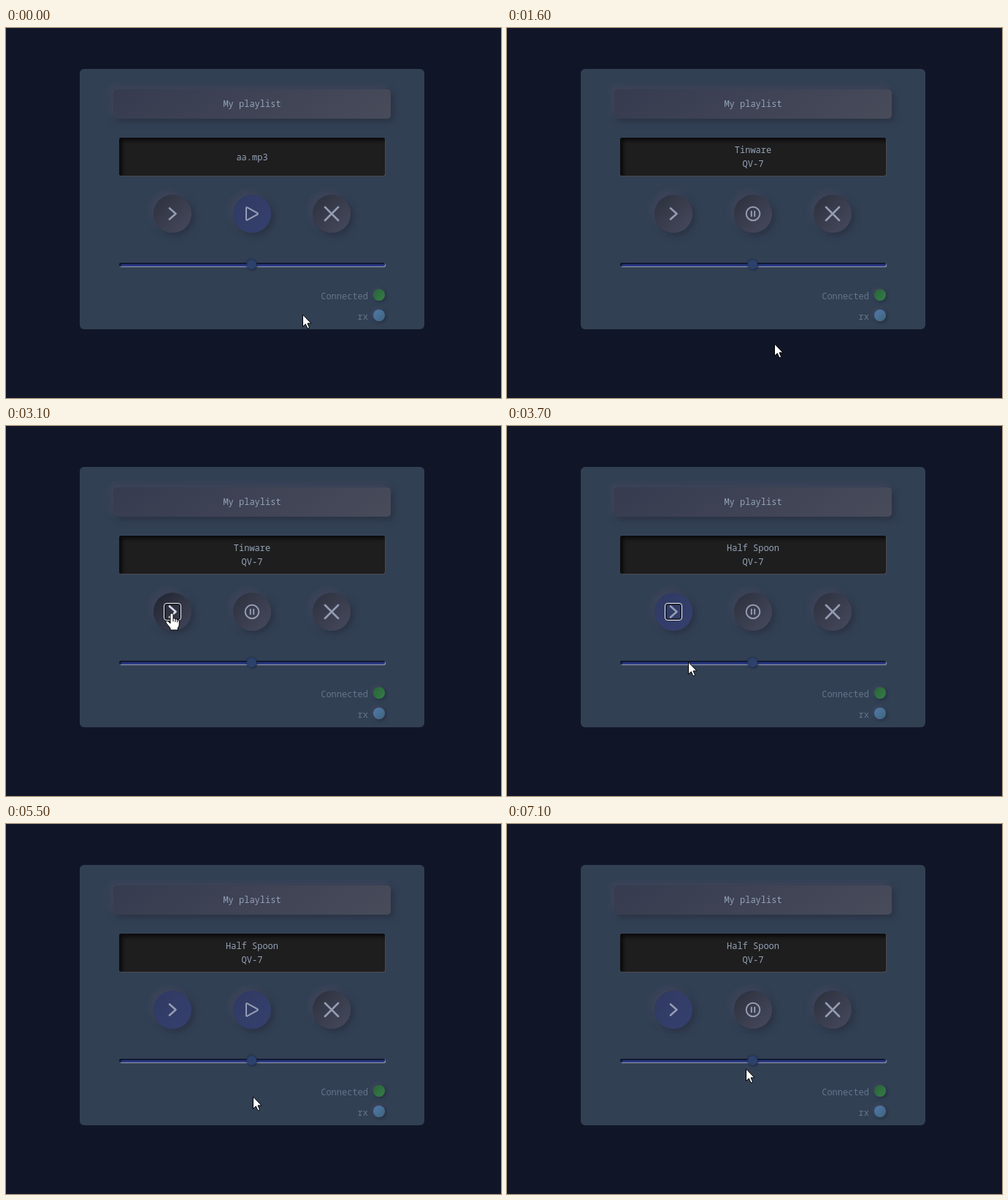
Recreate the animation shown at these times as an HTML page. Size 678 by 506 pixels, loop 7200 ms.

```html
<!DOCTYPE html>
<html lang="en">
<head>
<meta charset="utf-8">
<title>Player</title>
<style>
  html, body { margin: 0; width: 100%; height: 100%; overflow: hidden; background: #101627; }
  body { position: relative; font: 12px/19px "Noto Sans Mono", monospace; color: #94a3b8; cursor: default; }
  body * { position: absolute; box-sizing: border-box; }
  span { position: static; }
  .card { left: 101px; top: 56px; width: 472px; height: 356px; border-radius: 6px; background: #324054; }
  .raised { box-shadow: 4px 4px 8px #2a3344, -4px -4px 8px #41465c; }
  .title { left: 147px; top: 84px; width: 380px; height: 40px; border-radius: 5px; line-height: 39px;
    text-align: center; background: linear-gradient(145deg, #363b4f, #484b5a); }
  .display { left: 155px; top: 150px; width: 364px; height: 52px; border-radius: 3px; background: #1e1e1e;
    display: flex; align-items: center; justify-content: center; white-space: pre; text-align: center;
    box-shadow: inset 4px 4px 5px #0b0b0b, 1px 1px 1px #4d4c50; }
  .btn { left: calc(202px + 109px * var(--i)); top: 228px; width: 52px; height: 52px; border-radius: 50%;
    background: linear-gradient(135deg, #2c303d, #474a5d); }
  .btn.on { background: linear-gradient(135deg, #2f3a62, #36406f); }
  .btn.down { background: linear-gradient(135deg, #20232f, #42465a); }
  .btn svg { left: 0; top: 0; width: 52px; height: 52px; fill: none; stroke: #959cb2; stroke-width: 2;
    stroke-linecap: round; stroke-linejoin: round; }
  .btn.down svg { stroke: #dce0ea; }
  .ring { left: 216px; top: 242px; width: 24px; height: 24px; border: 1.5px solid #f4f5f8; border-radius: 4px;
    box-shadow: inset 0 0 0 1.5px #14161d; }
  .track { left: 155px; top: 321px; width: 364px; height: 5px; border-radius: 3px; background: #2d3c8c;
    box-shadow: inset 2px 2px 2px #0d1424, 1px 1px 1px #999eac; }
  .thumb { left: 330px; top: 317px; width: 13px; height: 13px; border-radius: 50%; background: #2c426c;
    box-shadow: 1px 1px 3px #1b2740, -1px -1px 3px #263450; }
  .row { left: 396px; top: calc(357px + 28px * var(--i)); width: 123px; height: 19px; padding-right: 23px;
    text-align: right; color: #65758a; }
  .row .sel { background: #0d3fa6; color: #fff; display: inline-block; }
  .dot { right: 0; top: 0; width: 16px; height: 16px; border-radius: 50%;
    background: linear-gradient(135deg, var(--a), var(--b));
    box-shadow: 2px 2px 4px #273142, -2px -2px 4px #41465c; }
  #pointer { left: 0; top: 0; width: 30px; height: 30px; overflow: visible; }
</style>
</head>
<body>
<div class="card"></div>
<div class="title raised">My playlist</div>
<div class="display"><span id="song"></span></div>

<div class="btn raised" id="next" style="--i:0">
  <svg><path d="M22 18.5 30.5 26 22 33.5" stroke-width="2.6"/></svg>
</div>
<div class="btn raised" id="play" style="--i:1">
  <svg id="playIcon"><path d="M18 18.2V33.8Q18 35.3 19.4 34.6L33.3 27Q34.8 26 33.3 25L19.4 17.4Q18 16.7 18 18.2Z"/></svg>
  <svg id="pauseIcon"><circle cx="26" cy="26" r="9.3"/><path d="M23.8 22.7V29.3M28.2 22.7V29.3"/></svg>
</div>
<div class="btn raised" style="--i:2">
  <svg><path d="M17 17 35 35M35 17 17 35" stroke-width="2.7"/></svg>
</div>
<div class="ring" id="ring"></div>

<div class="track"></div>
<div class="thumb"></div>
<div class="row" style="--i:0"><span id="status">Connected</span><i class="dot" style="--a:#296339;--b:#357d48"></i></div>
<div class="row" style="--i:1"><span>rx</span><i class="dot" style="--a:#5079aa;--b:#3f647c"></i></div>

<svg id="pointer" fill="#fff" stroke="#000" stroke-linejoin="round">
  <path id="arrow" d="M.5 1V17.5L4.3 13.9 7 19.9 9.6 18.8 7 12.9H12Z"/>
  <g id="hand">
    <path d="M-2 1.5Q-2 0 0 0T2 1.5V7Q4.5 6.2 5 8 7.3 7.3 7.8 9 10.3 8.6 10.3 11V15Q10.3 18 8.5 20V23H-2V20.5L-8 13Q-8.6 11 -6.8 10.5T-2 14Z"/>
    <path d="M2 7V11.5M5 8V12M7.8 9V12.5" fill="none"/>
  </g>
</svg>

<script>
const LOOP = 7200, STEP = 100;
const NEXT = [227, 256], PLAY = [336, 260];
const nextDown = 3000, nextUp = 3300;
const playClicks = [400, 5100, 6000];

// Each glide runs from one time to another and ends at a spot; the pointer rests between.
const home = [406, 391];
const glides = [
  [0, 300, PLAY], [400, 800, [383, 476]], [800, 1300, [366, 431]],
  [1800, 2900, NEXT], [nextUp, 3900, [256, 345]], [4100, 4400, [269, 390]], [4500, 4600, [301, 370]],
  [4600, 5000, PLAY], [5100, 5300, [321, 379]], [5400, 5500, [338, 372]],
  [5600, 6000, PLAY], [6100, 6500, [296, 387]], [7000, 7100, [327, 334]]
];

const $ = id => document.getElementById(id);
const show = (id, on) => { $(id).style.visibility = on ? "visible" : "hidden"; };
const within = (t, a, b) => t >= a && t < b;
const ease = k => k * k * (3 - 2 * k);

function tipAt(t) {
  let [x, y] = home;
  for (const [from, to, [tx, ty]] of glides) {
    if (t <= from) break;
    const k = ease(Math.min(1, (t - from) / (to - from)));
    x += (tx - x) * k;
    y += (ty - y) * k;
  }
  return [x, y];
}

function songAt(t) {
  if (t < playClicks[0]) return "aa.mp3";
  return (t < nextUp ? "Tinware" : "Half Spoon") + "\nQV-7";
}

function draw(t) {
  const [x, y] = tipAt(t);
  const hover = [NEXT, PLAY].some(([cx]) => Math.hypot(x - cx, y - 254) < 26);
  $("pointer").style.transform = `translate(${Math.round(x)}px, ${Math.round(y)}px)`;
  show("arrow", !hover);
  show("hand", hover);

  $("song").textContent = songAt(t);

  const paused = playClicks.filter(c => t >= c).length % 2 === 0;
  show("playIcon", paused);
  show("pauseIcon", !paused);
  $("play").classList.toggle("on", paused);
  $("next").classList.toggle("on", t > nextUp);
  $("next").classList.toggle("down", within(t, nextDown, nextUp + STEP));
  show("ring", within(t, nextDown, playClicks[1]));
  $("status").classList.toggle("sel", within(t, 700, 1000));
}

const start = performance.now();
function tick() {
  const t = (performance.now() - start) % LOOP;
  draw(Math.floor(t / STEP) * STEP);
  requestAnimationFrame(tick);
}
tick();
</script>
</body>
</html>
```
